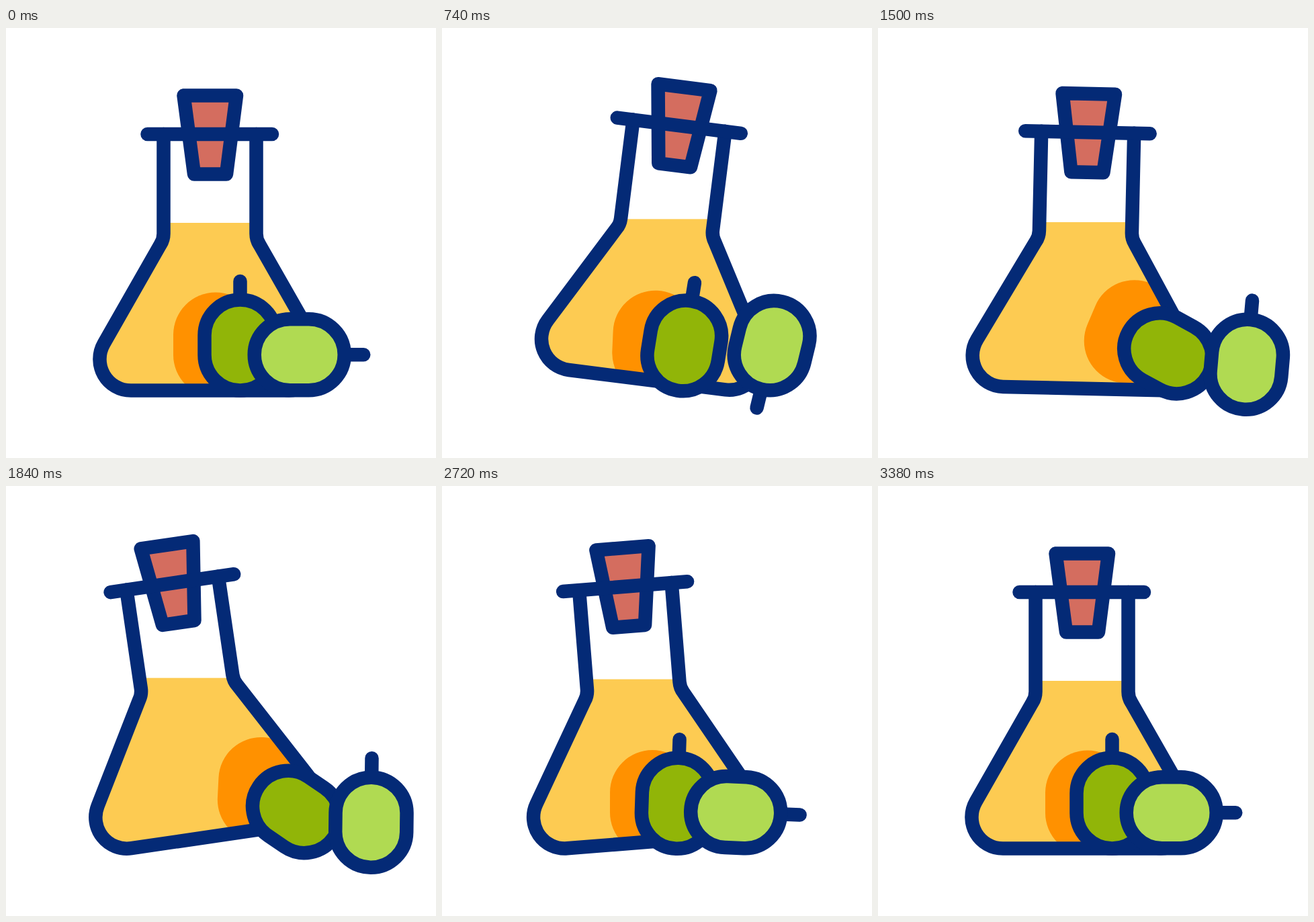
These frames come from a looping animation (640x640 px, 3600 ms). An HTML page:

```html
<!DOCTYPE html>
<html lang="en">
<head>
<meta charset="utf-8">
<title>Olive oil flask</title>
<style>
  html, body { margin: 0; width: 100%; height: 100%; overflow: hidden; background: #fff; }
  svg { display: block; width: 100%; height: 100%; }
  .line { stroke: #042a76; stroke-width: 20.5; stroke-linecap: round; stroke-linejoin: round; }
</style>
</head>
<body>
<svg viewBox="0 0 640 640">
  <defs>
    <path id="glass" d="M234.5 158V306Q234.5 315 229.9 322L145.7 469.7A46.5 46.5 0 0 0 186 539.5H421A46.5 46.5 0 0 0 461.3 469.7L377.1 322Q372.5 315 372.5 306V158"/>
    <clipPath id="inside"><use id="clipGlass" href="#glass"/></clipPath>
  </defs>
  <g clip-path="url(#inside)">
    <rect id="oil" x="60" width="520" height="400" fill="#fdcb52"/>
    <rect id="shade" x="-63" y="-78" width="126" height="156" rx="63" fill="#ff9100"/>
  </g>
  <g id="flask" class="line" fill="none">
    <use href="#glass"/>
    <path d="M264.5 100.5H343L328 217.5H280Z" fill="#d46d5f"/>
    <path d="M210.5 158H396"/>
  </g>
  <g id="darkOlive" class="line">
    <path d="M0-95V-68"/>
    <rect x="-53" y="-67.5" width="106" height="135" rx="53" fill="#91b508"/>
  </g>
  <g id="lightOlive" class="line">
    <path d="M95.5 0H68"/>
    <rect x="-67" y="-53" width="134" height="106" rx="53" fill="#b0da52"/>
  </g>
</svg>
<script>
const LOOP = 3600;
const GROUND = 549.5;
const RIGHT_TILT = 7.6, LEFT_TILT = -12.5, REBOUND = 3.8;
const $ = id => document.getElementById(id);

// Smooth progress from 0 to 1 between two times.
function ease(t, from, to) {
  const u = Math.min(1, Math.max(0, (t - from) / (to - from)));
  return u * u * (3 - 2 * u);
}

// Goes from 0 to 1, waits there, and comes back.
const trip = (t, leave, arrive, turnBack, home) => ease(t, leave, arrive) - ease(t, turnBack, home);

function place(id, x, y, turn) {
  $(id).setAttribute("transform", `translate(${x} ${y}) rotate(${turn})`);
}

function drawFlask(t) {
  const angle = RIGHT_TILT * ease(t, 320, 810)
    + (LEFT_TILT - RIGHT_TILT) * ease(t, 1120, 2140)
    + (REBOUND - LEFT_TILT) * ease(t, 2366, 3091)
    - REBOUND * ease(t, 3091, 3380);
  const pivot = angle > 0 ? "430 546" : "184 535";
  for (const id of ["flask", "clipGlass"]) $(id).setAttribute("transform", `rotate(${angle} ${pivot})`);
  $("oil").setAttribute("y", 290 - (angle > 0 ? 0.78 : -0.52) * angle);
}

function drawDarkOlive(t) {
  const slide = trip(t, 536, 1384, 1927, 2799);
  const roll = trip(t, 560, 1650, 1796, 2794);
  place("darkOlive", 348.5 + 83.5 * slide, 472 + 13 * roll, 125 * roll);
  place("shade", 312 + 67 * roll, 471.5 - 19.5 * slide, 500 * roll * roll * (1 - roll));
}

function drawLightOlive(t) {
  const slide = trip(t, 280, 1220, 1701, 2762);
  const turn = 275 * trip(t, 280, 1385, 1766, 2776);
  const drop = 28.5 * trip(t, 800, 1260, 1850, 2180);
  const reach = 63.3 + 14 * Math.abs(Math.sin(turn * Math.PI / 180));
  place("lightOlive", 436.7 + 112 * slide, GROUND - reach + drop, turn);
}

const start = performance.now();
function tick() {
  const t = (performance.now() - start) % LOOP;
  drawFlask(t);
  drawDarkOlive(t);
  drawLightOlive(t);
  requestAnimationFrame(tick);
}
tick();
</script>
</body>
</html>
```
